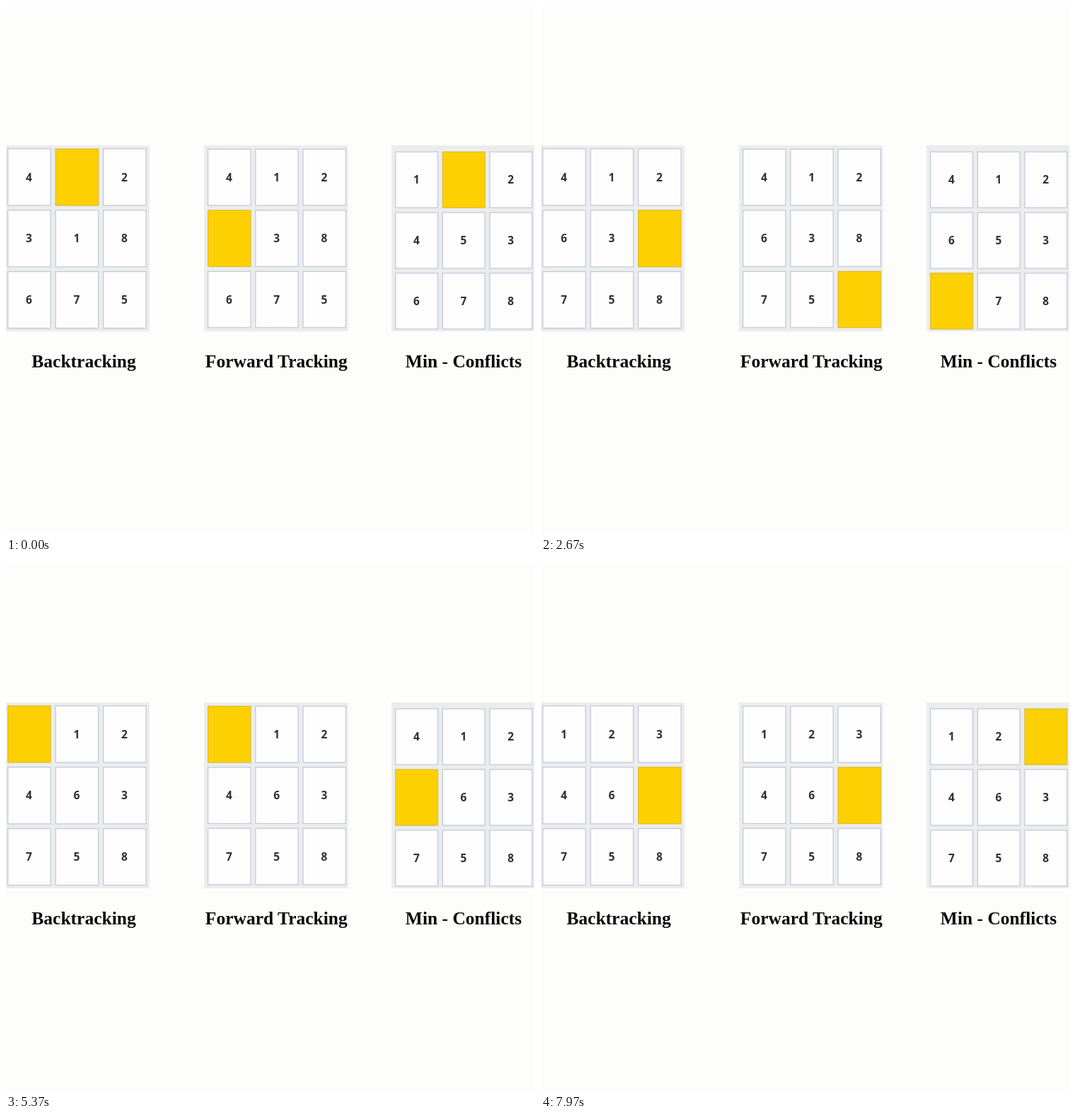
An HTML page that plays this animation: 748x748 px, repeating every 8000 ms.

```html
<!DOCTYPE html>
<html lang="en">
<head>
<meta charset="utf-8">
<title>Sliding puzzle solvers</title>
<style>
  html, body { margin: 0; width: 100%; height: 100%; overflow: hidden; background: #fdfdfc; }
  svg { display: block; width: 100vw; height: 100vh; }
  text { text-anchor: middle; }
  .panel { fill: #ebedec; }
  .tile rect { fill: #fdfdfd; stroke: #c0c5da; stroke-width: 1.2; }
  .tile text { font: 700 15.5px "Open Sans", "Noto Sans", sans-serif; fill: #2b2f3c; }
  .blank rect { fill: #fcd002; stroke: #dcbc30; }
  .caption { font: 700 25.5px "Liberation Serif", "Noto Serif", serif; fill: #080808; }
</style>
</head>
<body>
<svg viewBox="0 0 748 748"></svg>
<script>
const LOOP = 8000;
const svg = document.querySelector("svg");

// Cells read row by row, 0 is the blank; each move is [time, direction of the blank].
const boards = [
  {
    caption: "Backtracking", captionX: 110,
    panel: [0, 203], left: 2.6, top: 202, pitch: [67.5, 86.8], size: [60.5, 80],
    start: "402318675",
    moves: [[300, "D"], [730, "L"], [1250, "D"], [1770, "R"], [2200, "R"], [2630, "U"],
            [4500, "L"], [4930, "L"], [5360, "U"], [5800, "R"], [7000, "R"], [7730, "D"]]
  },
  {
    caption: "Forward Tracking", captionX: 382.3,
    panel: [280, 483.5], left: 285.6, top: 202.5, pitch: [67.2, 86.4], size: [60.4, 79.5],
    start: "412038675",
    moves: [[300, "D"], [700, "R"], [1150, "R"], [2900, "U"], [3560, "L"],
            [4700, "L"], [5150, "U"], [5550, "R"], [5950, "R"], [6700, "D"]]
  },
  {
    caption: "Min - Conflicts", captionX: 647,
    panel: [545, 747], left: 550.8, top: 206.2, pitch: [66.6, 85.8], size: [59.8, 79],
    start: "102453678",
    moves: [[400, "L"], [1100, "D"], [2000, "D"], [3000, "R"], [3700, "U"],
            [5100, "L"], [7500, "U"], [7700, "R"], [7900, "R"]]
  }
];
const STEP = { U: -3, D: 3, L: -1, R: 1 };

function add(parent, tag, attributes, content = "") {
  const node = document.createElementNS("http://www.w3.org/2000/svg", tag);
  for (const name in attributes) node.setAttribute(name, attributes[name]);
  node.textContent = content;
  return parent.appendChild(node);
}

function build(board) {
  const [x0, x1] = board.panel;
  const [width, height] = board.size;
  add(svg, "rect", { class: "panel", x: x0, y: 197, width: x1 - x0, height: 263 });
  board.tiles = [...board.start].map((_, i) => {
    const x = board.left + (i % 3) * board.pitch[0];
    const y = board.top + Math.floor(i / 3) * board.pitch[1];
    const group = add(svg, "g", {});
    add(group, "rect", { x, y, width, height });
    const label = add(group, "text", { x: x + width / 2 - 0.3, y: y + height / 2 + 5.6 });
    return { group, label };
  });
  add(svg, "text", { class: "caption", x: board.captionX, y: 511 }, board.caption);
}

function cellsAt(board, time) {
  const cells = [...board.start];
  let blank = cells.indexOf("0");
  for (const [when, direction] of board.moves) {
    if (when > time) break;
    const next = blank + STEP[direction];
    [cells[blank], cells[next]] = [cells[next], "0"];
    blank = next;
  }
  return cells;
}

function draw(now) {
  for (const board of boards) {
    cellsAt(board, now % LOOP).forEach((value, i) => {
      const { group, label } = board.tiles[i];
      group.setAttribute("class", value === "0" ? "tile blank" : "tile");
      label.textContent = value === "0" ? "" : value;
    });
  }
  requestAnimationFrame(draw);
}

boards.forEach(build);
draw(performance.now());
</script>
</body>
</html>
```
